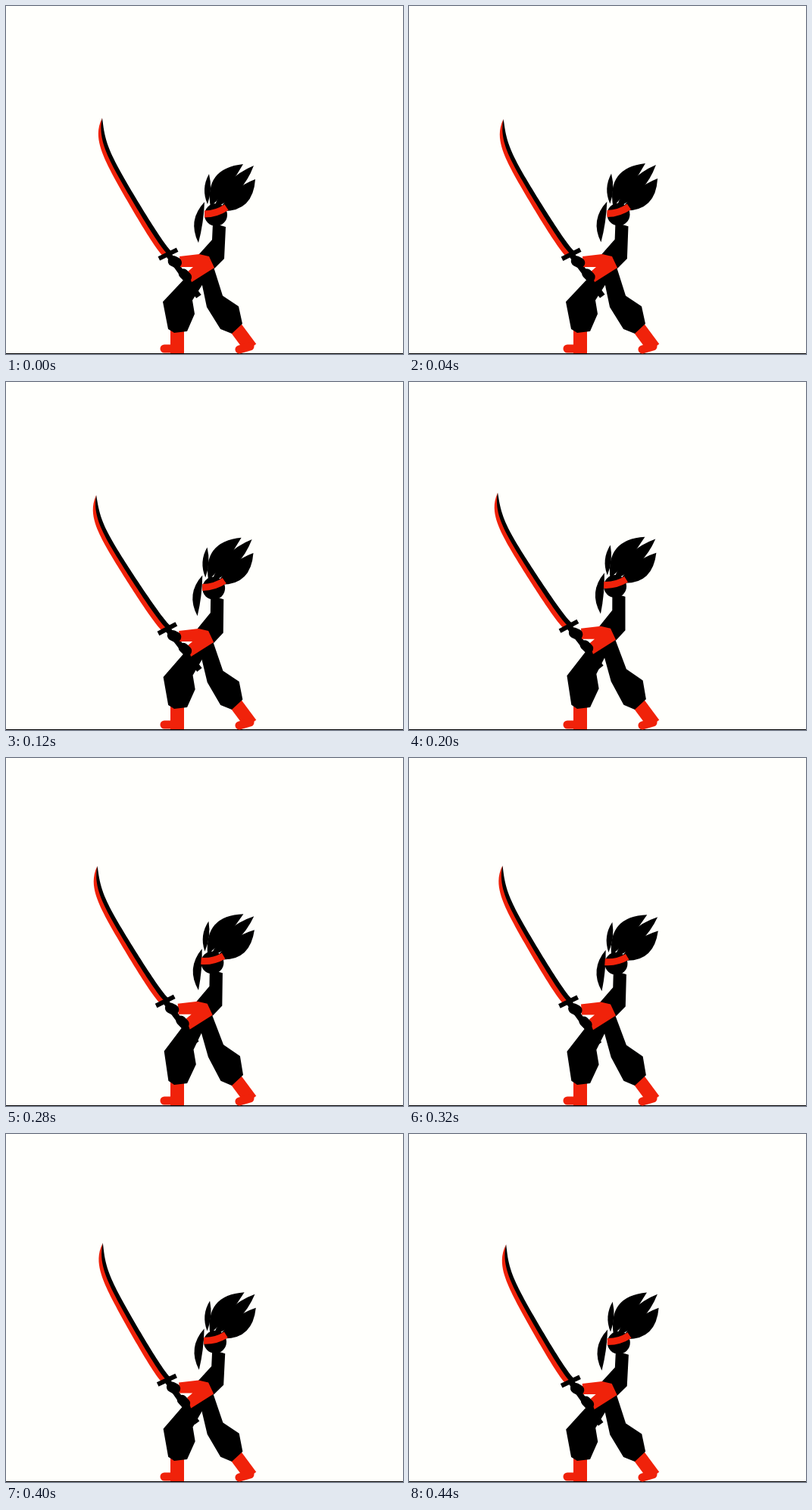
Animation, 524 px wide and 460 px high, one loop 480 ms. Source, as an HTML page with a canvas:

```html
<!DOCTYPE html>
<html lang="en">
<head>
<meta charset="utf-8">
<title>Ninja idle stance</title>
<style>
  html, body { margin: 0; width: 100%; height: 100%; overflow: hidden; background: #fffffc; }
  canvas { display: block; }
</style>
</head>
<body>
<canvas id="stage" width="524" height="460"></canvas>
<script>
const ctx = document.getElementById('stage').getContext('2d');
const LOOP = 480, STEP = 40;
const INK = '#000', RED = '#f0220a', PAPER = '#fffffc';
const BLADE = 200;

const clamp = v => Math.max(0, Math.min(1, v));
const wave = (t, peak) => Math.cos((t - peak) / LOOP * Math.PI * 2);

// Sway relative to the pose at time zero.
const sway = (t, amp, peak) => amp * (wave(t, peak) - wave(0, peak));

function polygon(color, points) {
  ctx.fillStyle = color;
  ctx.beginPath();
  points.forEach(p => ctx.lineTo(...p));
  ctx.fill();
}

function bar(color, a, b, width, cap = 'butt') {
  ctx.strokeStyle = color;
  ctx.lineWidth = width;
  ctx.lineCap = cap;
  ctx.beginPath();
  ctx.moveTo(...a);
  ctx.lineTo(...b);
  ctx.stroke();
}

function disc(color, center, radius) {
  ctx.fillStyle = color;
  ctx.beginPath();
  ctx.arc(...center, radius, 0, Math.PI * 2);
  ctx.fill();
}

// Pointed leaf whose two edges bow away from the line root-tip.
function leaf(root, tip, left, right) {
  const dx = tip[0] - root[0], dy = tip[1] - root[1], len = Math.hypot(dx, dy);
  const side = d => [root[0] + dx / 2 + dy / len * d, root[1] + dy / 2 - dx / len * d];
  ctx.fillStyle = INK;
  ctx.beginPath();
  ctx.moveTo(...root);
  ctx.quadraticCurveTo(...side(left), ...tip);
  ctx.quadraticCurveTo(...side(-right), ...root);
  ctx.fill();
}

function bootShape(ankle, heel, toe, instep) {
  bar(RED, ankle, heel, 18);
  bar(RED, toe, instep, 11, 'round');
}

function drawLegs(hip) {
  // Hips follow the body, ankles stay planted, knees bow out as the body rises.
  const move = ([x, y]) => {
    const k = clamp((431 - y) / 72);
    return [x + hip[0] * k - 1.3 * hip[0] * Math.sin(Math.PI * k), y + hip[1] * k];
  };
  bootShape([226, 427], [226, 459], [209, 453], [228, 453]);
  bootShape([303, 425], [323, 452], [308, 454], [322, 450]);
  polygon(INK, [[238, 358], [207, 391], [214, 427], [222, 432], [239, 430],
    [249, 407], [246, 389], [260, 367], [268, 345]].map(move));
  polygon(INK, [[256, 355], [265, 398], [283, 427], [298, 433], [312, 420],
    [307, 397], [286, 383], [274, 345]].map(move));
}

// Sword space: distance from the guard towards the tip, then across to the edge.
function swordSpace(t) {
  const grip = [214 + sway(t, 2, 30), 328 + sway(t, 3.4, 30)];
  const tip = [127 + sway(t, 5.2, 430), 148 + sway(t, 4.3, 95)];
  const angle = Math.atan2(tip[1] - grip[1], tip[0] - grip[0]);
  const c = Math.cos(angle), s = Math.sin(angle);
  return (along, across) => [grip[0] + along * c + across * s, grip[1] + along * s - across * c];
}

function drawBlade(at, color, from, to) {
  const edge = side => Array.from({ length: 51 }, (_, i) => {
    const s = i / 50;
    const bow = 20 * s ** 0.6 * (1 - s ** 8);
    const half = (6.5 - 1.5 * s) * (1 - s ** 20);
    return at(s * BLADE, bow + side * half);
  });
  polygon(color, [...edge(from), ...edge(to).reverse()]);
}

function drawSword(at) {
  drawBlade(at, RED, -0.2, 1);
  drawBlade(at, INK, -1, 0);
  bar(INK, at(0, -13.5), at(0, 13.5), 6);
  bar(INK, at(0, 0), at(-68, -12), 8);
}

function drawHands(at) {
  bar(INK, at(-11, -2), at(-15, -5), 14, 'round');
  bar(INK, at(-32, -7), at(-38, -9), 13, 'round');
}

function drawTorso(hip, head) {
  const move = ([x, y]) => {
    const k = clamp((345 - y) / 55);
    return [x + hip[0] + (head[0] - hip[0]) * k, y + hip[1] + (head[1] * 1.4 - hip[1]) * k];
  };
  polygon(INK, [[273, 287], [290, 292], [288, 334], [275, 347], [254, 329], [272, 309]].map(move));
}

function drawArms(hip) {
  const move = ([x, y]) => [x + hip[0], y + hip[1]];
  polygon(RED, [[229, 331], [255, 328], [268, 331], [275, 346], [245, 365],
    [240, 351], [247, 345], [230, 345]].map(move));
}

function drawHead(t, head) {
  const tilt = sway(t, 0.042, 290), pivot = [277, 270];
  const move = ([x, y]) => {
    const dx = x - pivot[0], dy = y - pivot[1];
    return [x + head[0] - dy * tilt, y + head[1] + dx * tilt];
  };
  const lock = (root, tip, left, right) => leaf(move(root), move(tip), left, right);

  disc(INK, move([277, 276]), 15);
  lock([266, 262], [268, 222], 10, 6);
  lock([270, 266], [313, 209], 38, 5);
  lock([274, 268], [327, 211], 18, 16);
  lock([281, 271], [329, 229], 12, 32);
  leaf(move([262, 259]), [254 + sway(t, 1.1, 380), 313 + head[1] * 1.1], 3, 19);

  ctx.strokeStyle = RED;
  ctx.lineWidth = 9;
  ctx.lineCap = 'butt';
  ctx.beginPath();
  ctx.moveTo(...move([262, 275]));
  ctx.quadraticCurveTo(...move([278, 275]), ...move([291, 266]));
  ctx.stroke();
}

function draw(t) {
  const hip = [sway(t, 1.2, 20), sway(t, 3.2, 25)];
  const head = [sway(t, 2.4, 465), sway(t, 3.1, 470)];
  const sword = swordSpace(t);

  ctx.fillStyle = PAPER;
  ctx.fillRect(0, 0, 524, 460);
  ctx.fillStyle = INK;
  ctx.fillRect(0, 459, 524, 1);
  drawLegs(hip);
  drawSword(sword);
  drawTorso(hip, head);
  drawArms(hip);
  drawHands(sword);
  drawHead(t, head);
}

function tick() {
  draw(Math.floor(performance.now() % LOOP / STEP) * STEP);
  requestAnimationFrame(tick);
}
tick();
</script>
</body>
</html>
```
